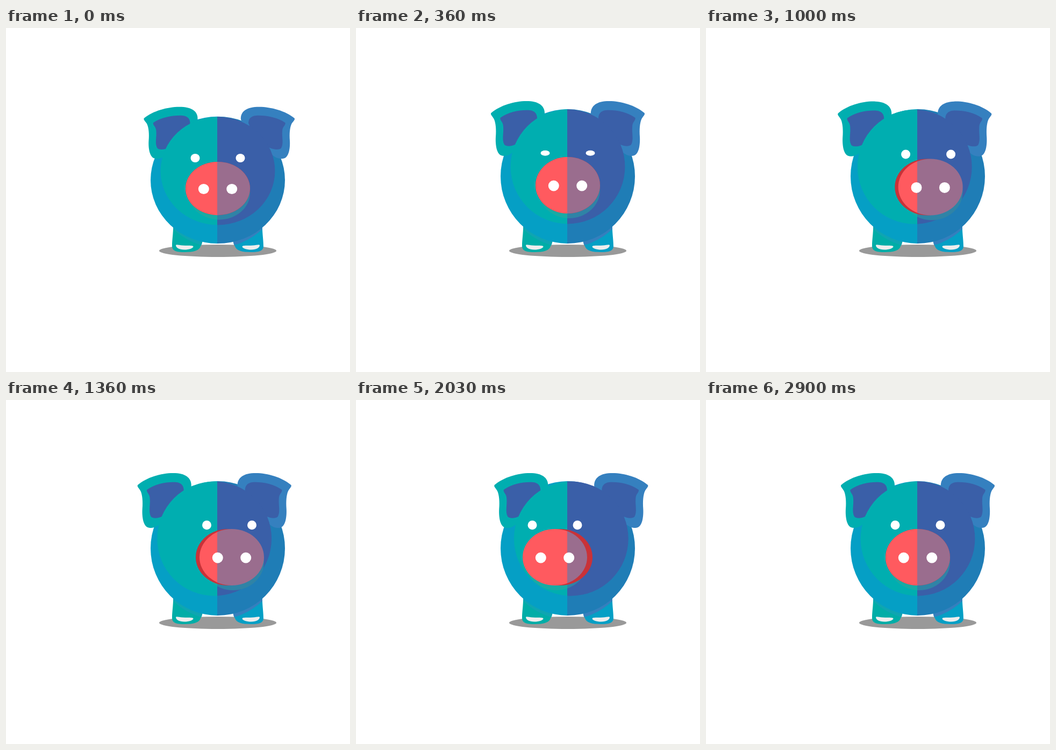
Write an HTML page with a canvas that moves like this. It is 640 by 640 pixels and loops after 3.06 s.

```html
<!DOCTYPE html>
<html lang="en">
<head>
<meta charset="utf-8">
<title>Piggy bank</title>
<style>
html, body { margin: 0; width: 100%; height: 100%; overflow: hidden; background: #fff; }
canvas { display: block; }
</style>
</head>
<body>
<canvas id="stage" width="640" height="640"></canvas>
<script>
const ctx = document.getElementById('stage').getContext('2d');
const LOOP = 3060, SPLIT = 393, AXIS = 394, GROUND = 402;
const TEAL = '#00aeb0', NAVY = '#3a5fa8';

const earOuter = new Path2D('M251.5 158C269 143 298 135 321 136C343 137 352 147 351 161L330 205L288 234C282 238 275 239 270 237C262 234 259 218 260 202C261 189 260 177 257 170C255 165 249 161 251.5 158Z');
const earInner = new Path2D('M268.5 167C284 156 306 152 323 153C333 154 337 160 337 168L322 205L296 217C289 220 280 221 276 217C271 208 275 196 274 184C274 174 267 172 268.5 167Z');
const leg = new Path2D('M311 355C312 380 309 392 309 406C309 415 318 417 332 417C349 417 360 414 362 406C365 402 364 400 366 396L350 350Z');
const hoof = new Path2D('M316 404C317 402 322 404 329 404.5C337 405 346 404 348.500 406C349 410 340 412.500 332 412.500C322 412 316 409 316 404Z');

// Resting head poses: sideways offsets of each layer.
const front = { snout: 0, back: 0, eyes: 0, face: 0 };
const right = { snout: 26, back: 19, eyes: 21.5, face: -6.3 };
const left = { snout: -24, back: -14, eyes: -24, face: 6.3 };
const turns = [
  [780, 1060, front, right],
  [1667, 2002, right, left],
  [2597, 2900, left, front]
];
const blinks = [[320, 500], [530, 700], [1197, 1360], [2227, 2400]];

const clamp = v => Math.max(0, Math.min(1, v));
const mix = (a, b, p) => a + (b - a) * p;
const ease = p => p < .5 ? 2 * p * p : 1 - 2 * (1 - p) ** 2;
const part = (t, a, b) => clamp((t - a) / (b - a));

function fill(color, path) {
  ctx.fillStyle = color;
  ctx.fill(path);
}

function oval(color, x, y, rx, ry = rx) {
  const path = new Path2D();
  path.ellipse(x, y, rx, ry, 0, 0, 7);
  fill(color, path);
}

function clipped(path, draw) {
  ctx.save();
  ctx.clip(path);
  draw();
  ctx.restore();
}

function halves(colorL, colorR, ...shape) {
  [[0, SPLIT, colorL], [SPLIT, 640 - SPLIT, colorR]].forEach(([x, w, color]) => {
    const side = new Path2D();
    side.rect(x, 0, w, 640);
    clipped(side, () => oval(color, ...shape));
  });
}

function mirrored(draw) {
  draw(0);
  ctx.save();
  ctx.translate(AXIS * 2, 0);
  ctx.scale(-1, 1);
  draw(1);
  ctx.restore();
}

function headPose(t) {
  let turn = turns[0];
  for (const next of turns) if (t >= next[0]) turn = next;
  const [start, end, from, to] = turn;
  const p = ease(part(t, start, end));
  const pose = { dip: Math.sin(Math.PI * p) };
  for (const key in from) pose[key] = mix(from[key], to[key], p);
  return pose;
}

function eyeOpen(t) {
  for (const [a, b] of blinks) {
    if (t > a && t < b) return mix(.1, 1, Math.abs(part(t, a, b) * 2 - 1));
  }
  return 1;
}

// Springs from start through peak to 0.
function spring(t, start, peak) {
  return t < 170
    ? mix(start, peak, ease(part(t, 0, 170)))
    : mix(peak, 0, ease(part(t, 170, 330)));
}

function drawLegs() {
  oval('#999', AXIS, 414.5, 109, 11.5);
  mirrored(i => {
    fill(['#00ada7', '#059fc5'][i], leg);
    clipped(leg, () => oval(['#0fa5b2', '#357fbd'][i], 398, 284, 125));
    fill('#eee', hoof);
  });
}

function drawEars(pose, squash, spread) {
  ctx.save();
  ctx.translate(pose.face, pose.dip * 2.5 - squash * 4);
  mirrored(i => {
    ctx.translate(spread, 0);
    fill([TEAL, '#3580bf'][i], earOuter);
    fill(NAVY, earInner);
  });
  ctx.restore();
}

function drawSnout(pose) {
  const x = AXIS + pose.snout, y = 292.5 + pose.dip * 12.5;
  halves('#19aaa4', '#2f83a6', x + 2.5, y + 9, 57.5, 52.5);
  oval('#c93238', AXIS + pose.back, y, 60, 52.5);
  halves('#ff5a5f', '#9a6d8e', x, y, 60, 52.5);
  for (const dx of [-26.2, 26.2]) oval('#fff', x + dx, y + 1, 10);
}

function draw(t) {
  const pose = headPose(t);
  const squash = spring(t, 1, -.2);
  const spread = spring(t, 5.5, -8);

  ctx.clearRect(0, 0, 640, 640);
  drawLegs();

  ctx.save();
  ctx.translate(0, GROUND);
  ctx.scale(1, 1 - .055 * squash);
  ctx.translate(0, -GROUND);
  halves('#059fc5', '#1f7db6', AXIS, 276, 125);
  drawEars(pose, squash, spread);
  halves(TEAL, NAVY, AXIS + pose.face, 258 + pose.dip * 1.5, 106.4);
  drawSnout(pose);
  for (const dx of [-42, 42]) {
    oval('#fff', AXIS + dx + pose.eyes, 232.7 + pose.dip * 8.5, 8.5, 8.5 * eyeOpen(t));
  }
  ctx.restore();
}

const begin = performance.now();
function tick() {
  draw((performance.now() - begin) % LOOP);
  requestAnimationFrame(tick);
}
tick();
</script>
</body>
</html>
```
